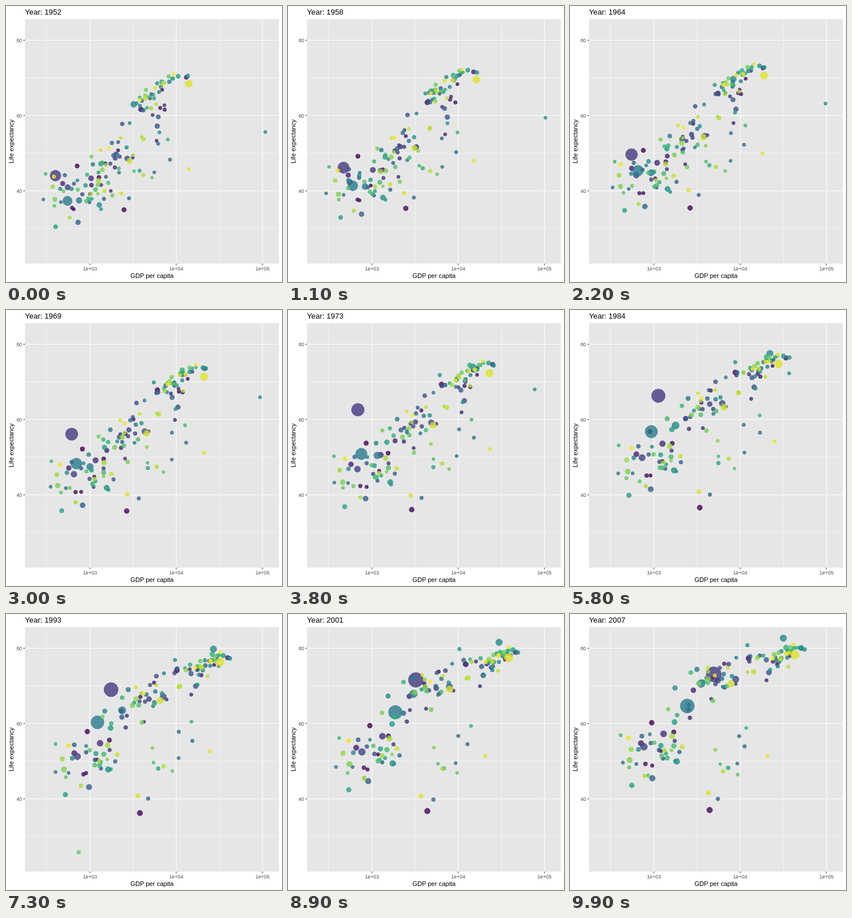
Write an HTML page with a canvas that moves like this. It is 480x480 px and loops after 10 s.

```html
<!DOCTYPE html>
<html lang="en">
<head>
<meta charset="utf-8">
<title>Life expectancy by GDP per capita</title>
<style>
  html, body { margin: 0; width: 100%; height: 100%; overflow: hidden; background: #fff; }
  svg, canvas { position: absolute; left: 0; top: 0; width: 480px; height: 480px; }
  text { font-family: "Liberation Sans", Arial, sans-serif; font-size: 11px; }
  .tick text { font-size: 8.8px; fill: #4d4d4d; }
  #year { font-size: 13.2px; }
</style>
</head>
<body>
<svg viewBox="0 0 480 480">
  <rect x="33" y="23" width="441.5" height="425" fill="#e6e6e6"/>
  <path d="M70.5 23V448M221 23V448M371.3 23V448M33 125H474.5M33 256H474.5M33 387H474.5"
        stroke="#fff" stroke-width=".55"/>
  <path d="M146 23V448M296 23V448M446 23V448M33 59.5H474.5M33 190.5H474.5M33 321.5H474.5"
        stroke="#fff" stroke-width="1.07"/>
  <path d="M146 448v2.75M296 448v2.75M446 448v2.75M33 59.5h-2.75M33 190.5h-2.75M33 321.5h-2.75"
        stroke="#333" stroke-width="1.07"/>
  <text id="year" x="33" y="15">Year: 1952</text>
  <g class="tick" text-anchor="middle">
    <text x="146" y="460">1e+03</text>
    <text x="296" y="460">1e+04</text>
    <text x="446" y="460">1e+05</text>
  </g>
  <g class="tick" text-anchor="end">
    <text x="28" y="62.8">80</text>
    <text x="28" y="193.8">60</text>
    <text x="28" y="324.8">40</text>
  </g>
  <text x="254" y="473" text-anchor="middle">GDP per capita</text>
  <text transform="translate(13 235.5) rotate(-90)" text-anchor="middle">Life expectancy</text>
</svg>
<canvas id="plot"></canvas>
<script>
const FRAMES = 100, LAST = FRAMES - 1, STEP = 100, COUNT = 142;
const SURVEY = 9; // frames between two surveys, five years apart
const VIRIDIS = ['440154', '482878', '3e4a89', '31688e', '26828e',
                 '1f9e89', '35b779', '6ece58', 'b5de2b', 'fde725'];

// Bubbles that stand out; points are evenly spaced in time, pop is in millions
const landmarks = [
  { tint: 24, pop: [556, 1318], at: [[86, 295], [105, 270], [123, 165], [156, 148], [195, 124], [250, 105]] },
  { tint: 58, pop: [372, 1110], at: [[107, 339], [124, 260], [147, 196], [204, 160]] },
  { tint: 134, pop: [157, 301], at: [[318, 135], [347, 114], [367, 87], [391, 71]] },
  { tint: 59, pop: [82, 223], at: [[127, 338], [148, 266], [195, 180], [228, 121]] },
  { tint: 66, pop: [86, 127], at: [[222, 171], [315, 105], [358, 66], [371, 42]] },
  { tint: 71, pop: [1, 3], at: [[451, 219], [441, 145], [362, 99], [399, 59]] },
  { tint: 107, pop: [3, 9], at: [[100, 322], [136, 281]], dip: 138 }
];

// Crowds lie along a line from low to high [x, y, x, y] at start, middle and end
const crowds = [
  { n: 30, spread: [7, 8], at: [[225, 170, 306, 118], [305, 114, 363, 84], [352, 84, 399, 58]] },
  { n: 48, spread: [18, 18], at: [[150, 322, 262, 165], [200, 205, 312, 110], [216, 128, 345, 76]] },
  { n: 44, spread: [14, 27], at: [[76, 345, 182, 298], [92, 295, 200, 230], [98, 265, 200, 200]] },
  { n: 13, spread: [14, 20], at: [[195, 320, 295, 250], [215, 315, 350, 190], [240, 310, 320, 215]] }
];

const lerp = (a, b, k) => a + (b - a) * k;

// Linear walk through evenly spaced points, k from 0 to 1
function along(points, k) {
  const s = k * (points.length - 1);
  const i = Math.min(points.length - 2, Math.floor(s));
  return points[i].map((v, j) => lerp(v, points[i + 1][j], s - i));
}

let seed = 1952;
function rand() {
  seed = (seed * 1664525 + 1013904223) >>> 0;
  return seed / 4294967296;
}
const gauss = () => (rand() + rand() + rand() - 1.5) * 2;

const stops = VIRIDIS.map(hex => [0, 2, 4].map(i => parseInt(hex.slice(i, i + 2), 16)));
const color = tint => `rgb(${along(stops, tint / (COUNT - 1)).map(Math.round)})`;

const bubbles = [...landmarks];
const free = [...Array(COUNT).keys()].filter(i => !landmarks.some(b => b.tint === i));

function member({ at, spread }, u) {
  const gx = gauss() * spread[0], gy = gauss() * spread[1], path = [];
  for (let f = 0; f <= LAST; f += SURVEY) {
    const [xa, ya, xb, yb] = along(at, f / LAST);
    path.push([lerp(xa, xb, u) + gx + gauss() * 2.5, lerp(ya, yb, u) + gy + gauss() * 1.5]);
  }
  const pop = Math.min(60, 5 * Math.exp(gauss() * 1.15));
  const tint = free.splice(Math.floor(rand() * free.length), 1)[0];
  return { tint, pop: [pop, pop * lerp(2.9, 1.5, u)], at: path };
}

for (const crowd of crowds)
  for (let i = 0; i < crowd.n; i++) bubbles.push(member(crowd, (i + rand()) / crowd.n));

bubbles.sort((a, b) => a.tint - b.tint);
for (const b of bubbles) b.color = color(b.tint);

const canvas = document.getElementById('plot');
const ctx = canvas.getContext('2d');
const year = document.getElementById('year');
const ratio = window.devicePixelRatio || 1;
canvas.width = canvas.height = 480 * ratio;
ctx.scale(ratio, ratio);
ctx.globalAlpha = 0.8;
ctx.lineWidth = 0.7;

function draw(f) {
  const k = f / LAST;
  const pulse = Math.max(0, 1 - Math.abs(f - 8 * SURVEY) / SURVEY);
  year.textContent = 'Year: ' + Math.round(lerp(1952, 2007, k));
  ctx.clearRect(0, 0, 480, 480);
  for (const { at, pop, color, dip = 0 } of bubbles) {
    const [x, y] = along(at, k);
    const r = 2.5 + 10.65 * Math.sqrt(lerp(pop[0], pop[1], k) / 1318);
    ctx.fillStyle = ctx.strokeStyle = color;
    ctx.beginPath();
    ctx.arc(x, y + dip * pulse, r, 0, Math.PI * 2);
    ctx.fill();
    ctx.stroke();
  }
}

const start = performance.now();
let shown = -1;
function tick() {
  const f = Math.floor((performance.now() - start) / STEP) % FRAMES;
  if (f !== shown) draw(shown = f);
  requestAnimationFrame(tick);
}
tick();
</script>
</body>
</html>
```
